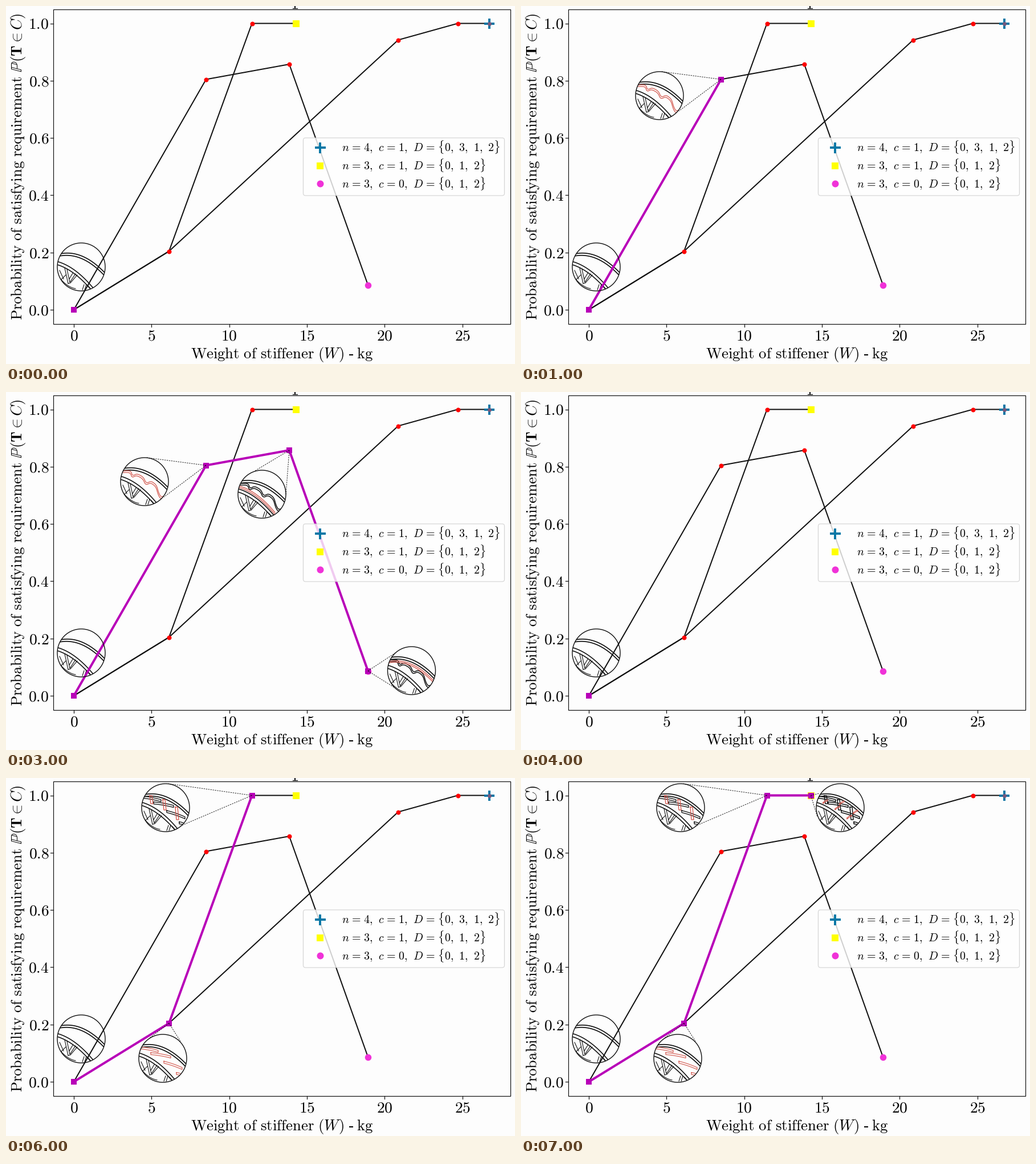
Animation of 893 by 627 pixels, one loop 8 s. Source, as a matplotlib script:

```python
import numpy as np
import matplotlib.pyplot as plt
from matplotlib.animation import FuncAnimation
from matplotlib.patches import Circle, FancyBboxPatch, Rectangle

W, H, DPI = 893, 627, 72  # one point equals one pixel
BLACK, RED, PURPLE = "#101010", "#d2544a", "#b800b8"
BLUE, YELLOW, PINK = "#0a78a6", "#ffff00", "#f032d8"

plt.rcParams["mathtext.fontset"] = "cm"
plt.rcParams["font.family"] = "Liberation Serif"

fig = plt.figure(figsize=(W / DPI, H / DPI), dpi=DPI, facecolor="#fdfdfd")
ax = fig.add_axes([0, 0, 1, 1])
ax.set_xlim(0, W)
ax.set_ylim(H, 0)
ax.axis("off")


def px(x, y):
    """Data values to stage pixels."""
    return 119 + 27.27 * x, 532 - 501.5 * y


def stroke(points, color=BLACK, lw=1.0, z=2, **kw):
    x, y = np.transpose(points)
    return ax.plot(x, y, color=color, lw=lw, zorder=z, **kw)[0]


def marker(point, shape, size, color, z=4, width=0):
    ax.plot(*point, marker=shape, ms=size, color=color, mew=width, zorder=z)


def label(x, y, text, size, **kw):
    ax.text(x, y, text, fontsize=size, color="black", va="baseline",
            zorder=8, **kw)


def roman(text):
    return r"\mathrm{" + text.replace(" ", r"\ ") + "}"


# Axes box, ticks and labels
ax.add_patch(Rectangle((83, 6), 802, 551, fill=False, ec=BLACK, lw=1.2, zorder=3))
for value in range(0, 30, 5):
    x = px(value, 0)[0]
    stroke([(x, 557), (x, 562)], lw=1.2)
    label(x, 586, f"${roman(str(value))}$", 27.5, ha="center")
for i in range(6):
    y = px(0, i / 5)[1]
    stroke([(78, y), (83, y)], lw=1.2)
    label(75.5, y + 9.5, f"${roman(f'{i / 5:.1f}')}$", 27.5, ha="right")
label(484, 617, f"${roman('Weight of stiffener ')}(W)$ - ${roman('kg')}$",
      26.7, ha="center")
label(28, 281, "$" + roman("Probability of satisfying requirement ")
      + r"\mathbb{P}(\mathbf{T}\in C)$", 26.7, ha="center",
      rotation=90, rotation_mode="anchor")

# Tail of the cropped title
stroke([(506.5, -2), (506.5, 4)], lw=2)
stroke([(502.5, 4), (511, 4)], lw=1.3)

# Three design paths
O, A, B, C = px(0, 0), (351, 128.5), (497, 102), (635, 488.5)
D, E, F = (286, 429.5), (431.5, 30.5), (508.5, 30.5)
G, K, L = (688, 59.5), (792.5, 30.5), (848, 30.5)
for path in ([O, A, B, C], [O, D, E, F], [O, D, G, K, L]):
    stroke(path, lw=2)
for point in (A, B, D, E, G, K):
    marker(point, "o", 8, "#ff0000")
marker(C, "o", 11.5, PINK)
marker(F, "s", 11.5, YELLOW)
marker(L, "+", 18, BLUE, width=4)
marker(L, "o", 7, "#75597d")

# Legend
ax.add_patch(FancyBboxPatch((525.5, 235), 345, 93,
                            boxstyle="round,pad=4,rounding_size=4",
                            fc="white", ec="#cccccc", lw=1.2, alpha=0.8, zorder=7))
marker((551, 248), "+", 19, BLUE, 8, 4)
marker((551, 280), "s", 12, YELLOW, 8)
marker((551, 311), "o", 12, PINK, 8)
EQ, COMMA = r"\hspace{0.12}=\hspace{0.12}", r",\hspace{0.37}"
for y, n, c, order in ((255, 4, 1, "0312"), (287, 3, 1, "012"), (318.5, 3, 0, "012")):
    terms = [f"n{EQ}{n}", f"c{EQ}{c}", f"D{EQ}" + r"\{" + COMMA.join(order) + r"\}"]
    label(589, y, f"${COMMA.join(terms)}$", 20)


# Round detail views, drawn relative to their centre
def arc(p0, p1, p2):
    """Parabola through three points."""
    x, y = np.transpose([p0, p1, p2])
    t = np.linspace(x[0], x[2], 30)
    return np.transpose([t, np.polyval(np.polyfit(x, y, 2), t)])


def shift(points, dx, dy):
    return np.asarray(points) + (dx, dy)


def bar(x0, y0, x1, y1, h=3.5):
    """Slim curved strip."""
    top = arc((x0, y0), ((x0 + x1) / 2, (y0 + y1) / 2 - 0.8), (x1, y1))
    return np.vstack([top, shift(top[::-1], 0, h), top[:1]])


def cross(x, y, h=9, tilt=2):
    """Upright strip crossing a bar."""
    return [(x - 2, y - h), (x + 2, y - h), (x + 2 + tilt, y + h),
            (x - 2 + tilt, y + h), (x - 2, y - h)]


UPPER = arc((-37, -23), (0, -19.5), (43, 12))
LOWER = arc((-42, -9.5), (-17, 2), (21, 37))
TRUSS = [
    [(-38, 6), (-31, 21)], [(-35, 22), (-27, 14)],
    [(-29, 2), (-23, 29)], [(-25, 4), (-20, 27), (-10, 12)],
    [(-23, 29), (-19, 28), (-7, 14)], [(-15, 11), (-21, 21)],
    [(5, 31), (2, 40)], [(9, 31), (6, 40)], [(12, 33), (17, 39)],
    arc((-39, 18), (-27, 30), (-10, 38)),
]
WAVE = [(-38, -19), (-24, -19), (-21, -10), (-13, -14), (-2, -8), (3, 3),
        (12, -1), (21, 6), (25, 20), (29, 27), (36, 25)]
BARS = [bar(-39, -20, -8, -14), bar(-21, -10, 14, -4),
        bar(2, 5, 34, 16), bar(24, 25, 33, 28)]
CROSSES = [cross(-26, -14, 7), cross(-3, -5), cross(19, 10, 11)]


def smooth(points, n=6):
    """Rounded copy of a polyline."""
    p = np.asarray(points, float)
    t = np.linspace(0, len(p) - 1, n * (len(p) - 1) + 1)
    x, y = (np.interp(t, np.arange(len(p)), p[:, i]) for i in (0, 1))
    box = np.ones(5) / 5
    x, y = (np.convolve(np.pad(v, 2, mode="edge"), box, "valid") for v in (x, y))
    return np.transpose([x, y])


def tint(lines, color, lw=1.1):
    return [(points, color, lw) for points in lines]


def waves(color, lw):
    return tint([smooth(WAVE), smooth(shift(WAVE, -1, 3))], color, lw)


BASE = (tint([UPPER, shift(UPPER, -1.5, 4)], BLACK, 1.7)
        + tint([LOWER, shift(LOWER, -2, 5)], BLACK, 1.6)
        + tint(TRUSS, BLACK, 1.1))
LOWER_RED = tint([shift(LOWER, 2, -5), shift(LOWER, 1, -2.5)], RED, 1.3)
UPPER_RED = tint([shift(UPPER, -3, 7), shift(UPPER, -4, 9.5)], RED, 1.3)
BITS = tint([bar(x, y, x + 8, y - 5, 2)
             for x, y in ((-30, -9), (-9, 2), (-1, -7), (12, 18), (23, 9))], RED)


def inset(cx, cy, extra=(), anchor=None, ends=()):
    """Detail view with dashed leaders to its point."""
    ring = Circle((cx, cy), 42, fill=False, ec=BLACK, lw=1.4, zorder=6)
    ax.add_patch(ring)
    parts = [ring]
    for points, color, lw in list(BASE) + list(extra):
        line = stroke(shift(points, cx, cy), color, lw, 5)
        line.set_clip_path(ring)
        parts.append(line)
    for end in ends:
        parts.append(stroke([anchor, end], lw=0.9, z=6, dashes=(2.6, 1.8)))
    return parts


inset(132, 457)
views = {
    A: inset(243, 157, waves(RED, 1.2), A, [(247, 115), (277, 184)]),
    B: inset(449, 179, waves(BLACK, 1.5) + LOWER_RED, B, [(437, 138), (491, 180)]),
    C: inset(711.5, 488, waves(BLACK, 1.5) + UPPER_RED, C, [(683, 457), (682, 518)]),
    D: inset(275, 491, tint(BARS, RED), D, [(251, 456), (306, 461)]),
    E: inset(280, 52, tint(BARS, BLACK, 1.3) + tint(CROSSES, RED, 1.3), E,
             [(285, 10), (306, 84)]),
    F: inset(560, 52, tint(BARS + CROSSES, BLACK, 1.5) + BITS, F,
             [(523, 27), (520, 68)]),
}

trail, = ax.plot([], [], color=PURPLE, lw=4, marker="s", ms=9.5, mew=0, zorder=5)
STEPS = [[O, A, B, C][:k] for k in range(1, 5)] + [[O, D, E, F][:k] for k in range(1, 5)]


def update(i):
    step = STEPS[i]
    trail.set_data(*zip(*step))
    for point, parts in views.items():
        for part in parts:
            part.set_visible(point in step)
    return []


anim = FuncAnimation(fig, update, frames=len(STEPS), init_func=lambda: update(0),
                     interval=1000, repeat=True, repeat_delay=0, blit=False)
plt.show()
```
